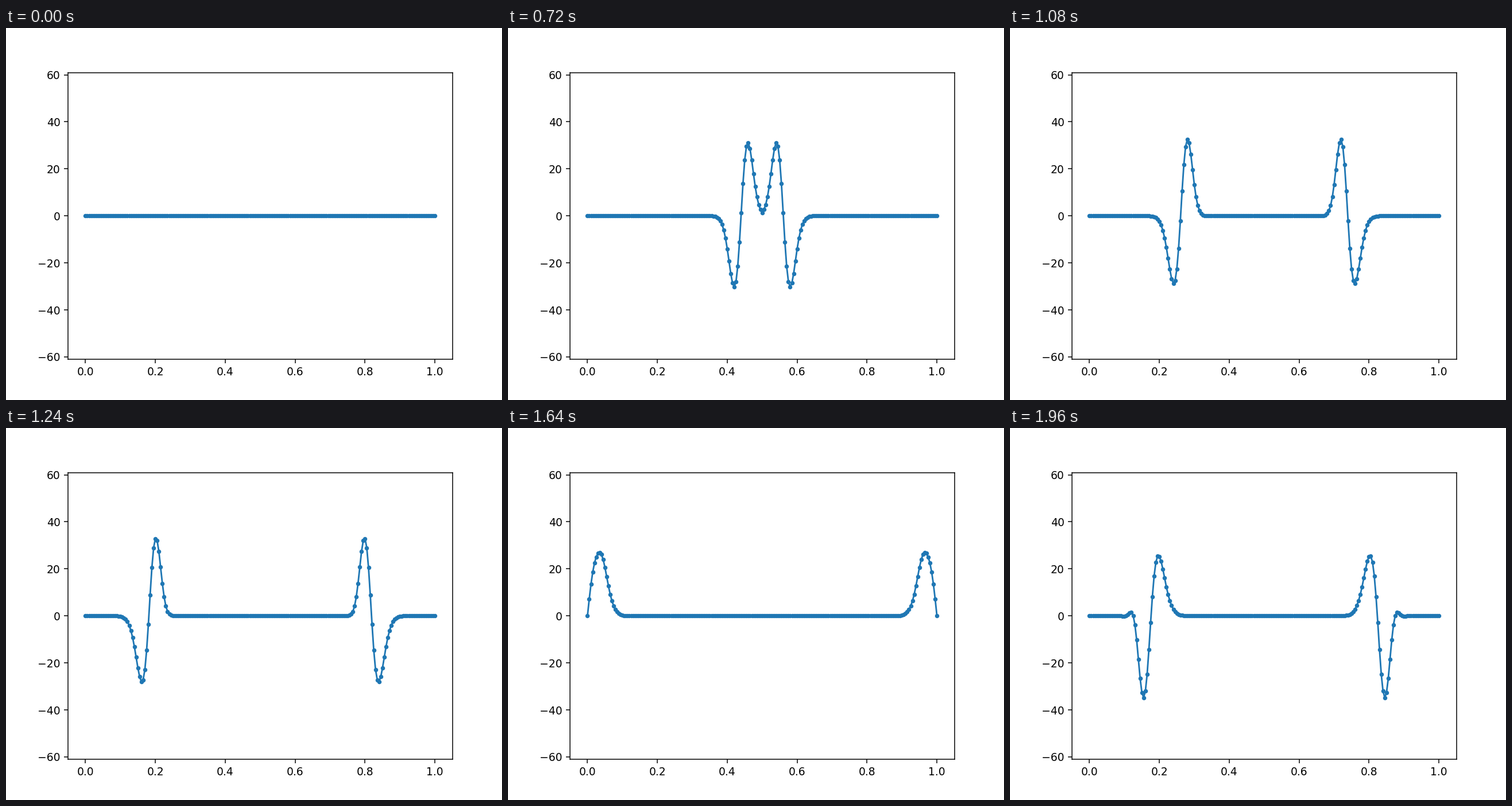
A matplotlib script that plays this animation: 864x648 px, repeating every 2 s.

```python
import numpy as np
import matplotlib.pyplot as plt
from matplotlib.animation import FuncAnimation

# 1D wave equation with unit speed, fixed ends and a Ricker source in the middle
NX = 201
DX = 1 / (NX - 1)
DT = 0.001
STEPS_PER_FRAME = 20
FRAMES = 50
T0, SIGMA = 0.3, 0.02
Y_LIMIT = 60.93


def ricker(t):
    q = ((t - T0) / SIGMA) ** 2
    return 2 / SIGMA**2 * (1 - q) * np.exp(-q / 2)


def simulate():
    """Return the displacement for every animation frame."""
    c2 = (DT / DX) ** 2
    prev, cur = np.zeros(NX), np.zeros(NX)
    history = []
    for n in range((FRAMES - 1) * STEPS_PER_FRAME + 1):
        new = np.zeros(NX)
        new[1:-1] = (2 * cur[1:-1] - prev[1:-1]
                     + c2 * (cur[2:] - 2 * cur[1:-1] + cur[:-2]))
        new[NX // 2] += DT**2 * ricker(n * DT) / DX
        prev, cur = cur, new
        if n % STEPS_PER_FRAME == 0:
            history.append(cur)
    return history


x = np.linspace(0, 1, NX)
waves = simulate()

fig, ax = plt.subplots(figsize=(6.4, 4.8), dpi=135)
line, = ax.plot(x, waves[0], ".-")
ax.set_ylim(-Y_LIMIT, Y_LIMIT)


def update(i):
    line.set_ydata(waves[i])
    return line,


anim = FuncAnimation(fig, update, frames=FRAMES, interval=40,
                     repeat=True, repeat_delay=0)
plt.show()
```
